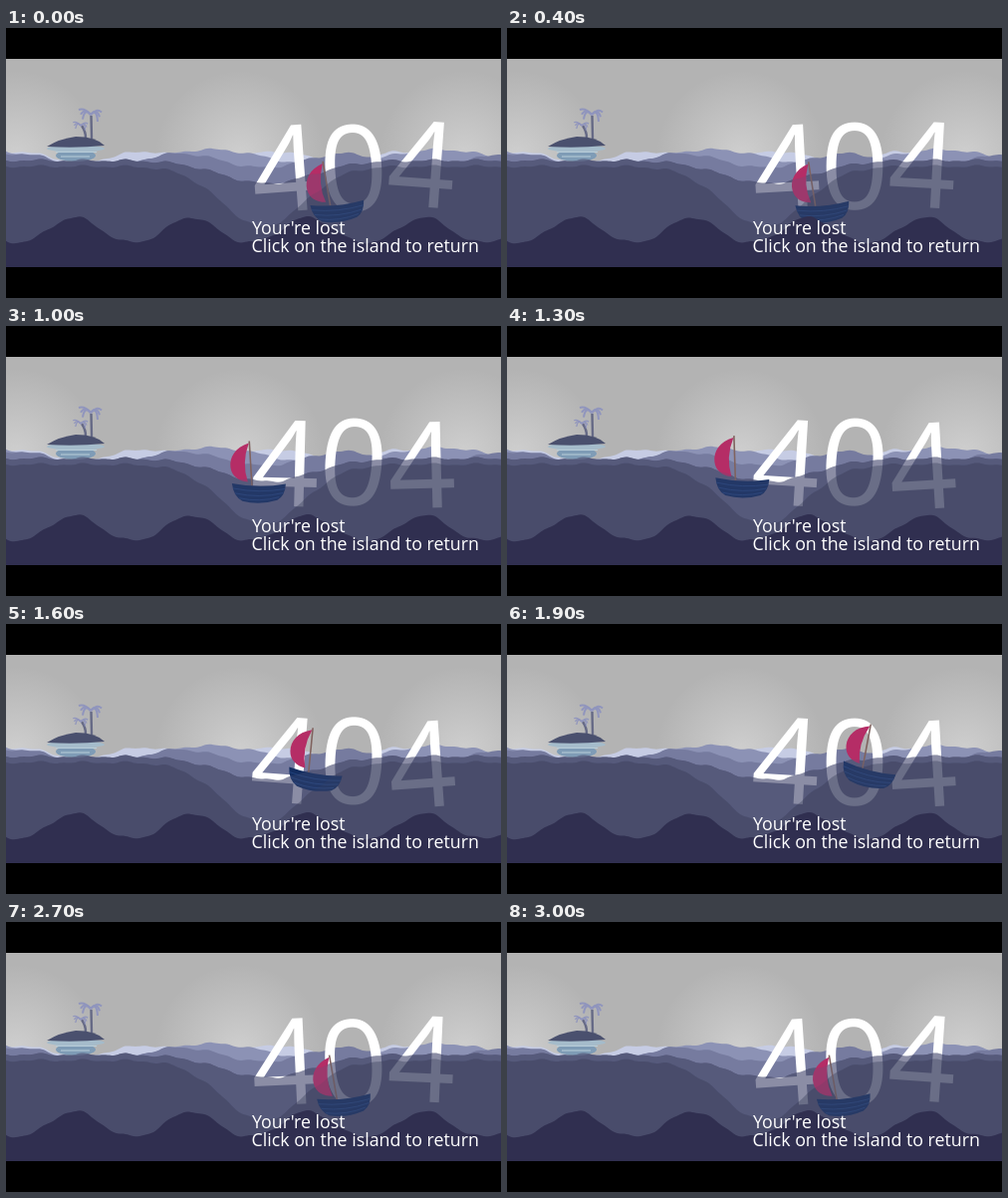
Recreate the animation shown at these times as an HTML page with a canvas. Size 497 px wide and 271 px high, loop 3.1 s.

```html
<!DOCTYPE html>
<html lang="en">
<head>
<meta charset="utf-8">
<title>404</title>
<style>
  html, body { margin: 0; width: 100%; height: 100%; overflow: hidden; background: #000; }
  canvas { display: block; }
</style>
</head>
<body>
<canvas id="stage" width="497" height="271"></canvas>
<script>
const ctx = document.getElementById('stage').getContext('2d');
const W = 497, H = 271, LOOP = 3100, STEP = 100;
const FONT = '"Open Sans", "Noto Sans", sans-serif';

const wave = (x, peak, period) => Math.cos(2 * Math.PI * (x - peak) / period);
const bump = (x, center, width) => Math.exp(-(((x - center) / width) ** 2));
const rough = x => Math.sin(x / 7) + 0.6 * Math.sin(x / 3.3);

// Area below a ridge line, slightly roughened.
function ridge(height) {
  const path = new Path2D();
  path.moveTo(0, H);
  for (let x = 0; x <= W + 2; x += 2) path.lineTo(x, height(x) + rough(x));
  path.lineTo(W, H);
  return path;
}

const clouds = ridge(x => 129 - 5 * wave(x, 140, 130));
const far = ridge(x => 130 - 8 * wave(x, 205, 230));
const mid = ridge(x => 133 - 7 * wave(x, 10, 165));
const hills = ridge(x => 133 + 23 * bump(x, 262, 65));
const slopes = ridge(x => 139 + 60 * bump(x, 258, 58));
const front = ridge(x => 215 - 25 * (0.5 + 0.5 * wave(x, 69, 117)) ** 1.2);
const HILL = '#565a7b', SLOPE = '#3f445d';

function fill(path, color, alpha = 1) {
  ctx.globalAlpha = alpha;
  ctx.fillStyle = color;
  ctx.fill(path);
  ctx.globalAlpha = 1;
}

function stroke(d, color, width) {
  ctx.strokeStyle = color;
  ctx.lineWidth = width;
  ctx.stroke(new Path2D(d));
}

function ellipse(x, y, rx, ry, color) {
  ctx.fillStyle = color;
  ctx.beginPath();
  ctx.ellipse(x, y, rx, ry, 0, 0, 2 * Math.PI);
  ctx.fill();
}

// Things standing in the hills show through this haze.
function haze(hillAlpha, slopeAlpha) {
  fill(hills, HILL, hillAlpha);
  fill(slopes, SLOPE, slopeAlpha);
}

function glow(x, y, r) {
  const g = ctx.createRadialGradient(x, y, 0, x, y, r);
  g.addColorStop(0, 'rgba(225,225,225,.6)');
  g.addColorStop(1, 'rgba(225,225,225,0)');
  ctx.fillStyle = g;
  ctx.fillRect(0, 0, W, H);
}

function palm(x, y, size) {
  for (let i = 0; i < 6; i++) {
    const side = i % 2 ? 1 : -1;
    const tipX = x + side * size * (12 - i), tipY = y + size * (i * 2.4 - 5);
    stroke(`M${x} ${y}Q${x + side * size * 6} ${y - size * 7} ${tipX} ${tipY}`, '#9095bd', 2 * size);
  }
}

function island() {
  ellipse(70, 128, 20, 6, '#7f9cb6');
  ellipse(70, 121, 29, 3.5, '#a5bccb');
  stroke('M50 124.5H91M55 129H84', '#b9ced9', 1);
  stroke('M86 111L85.5 88M80 110Q80 104 76 98', '#666a86', 2.4);
  palm(85, 87, 1);
  palm(75, 98, 0.65);
  fill(new Path2D('M41 119Q54 111 70 109Q90 109 99 118Q70 121 41 119Z'), '#4a506e');
}

// Digits rise and lean together; `peak` is the moment of the highest pose.
function digit(char, x, peak, t) {
  const swing = wave(t, peak, LOOP);
  ctx.save();
  ctx.translate(x + 34.3, 138.8 - 2.4 * swing);
  ctx.rotate(4.2 * swing * Math.PI / 180);
  ctx.fillText(char, -34.3, 43);
  ctx.restore();
}

// time, x, y, tilt in degrees
const voyage = [
  [1350, 236, 162, 0],
  [2000, 366, 153, 13],
  [2500, 342, 184, -8],
  [3000, 339, 184, -8],
  [3650, 316, 185, -7],
  [4450, 236, 162, 0]
];

function boatPose(t) {
  if (t < voyage[0][0]) t += LOOP;
  const i = voyage.findIndex(key => key[0] > t);
  const from = voyage[i - 1], to = voyage[i];
  const p = Math.sin((t - from[0]) / (to[0] - from[0]) * Math.PI / 2);
  return from.slice(1).map((v, k) => v + (to[k + 1] - v) * p);
}

function boat(t) {
  const [x, y, tilt] = boatPose(t);
  ctx.save();
  ctx.translate(x, y);
  ctx.rotate(tilt * Math.PI / 180);
  stroke('M-8.5-52L-7-7', '#80635f', 1.6);
  fill(new Path2D('M-9-50C-23-46-29-36-28-26C-27-17-20-12-11-11Q-17-30-9-50Z'), '#b52d66');
  fill(new Path2D('M-27-10Q0-4 27-8Q26 4 18 8Q0 13-17 8Q-26 3-27-10Z'), '#132d60');
  stroke('M-26-5Q0 1 26-3M-24 0Q0 6 24 1M-20 5Q0 10 20 5', '#234580', 0.8);
  ctx.restore();
}

function draw(t) {
  ctx.fillStyle = '#b3b3b3';
  ctx.fillRect(0, 0, W, H);
  for (let x = 10; x < W; x += 225) glow(x, 128, 85);
  fill(clouds, '#c6cce4');
  fill(far, '#8c92b5');
  fill(mid, '#767b9f');
  haze(1, 1);
  island();

  ctx.fillStyle = '#fff';
  ctx.font = `120px ${FONT}`;
  digit('4', 246, 1600, t);
  digit('0', 314.6, 1150, t);
  digit('4', 383.2, 50, t);
  haze(0.58, 0.35);

  boat(t);
  haze(0.25, 0.15);
  fill(front, '#302f50');

  ctx.fillStyle = '#fff';
  ctx.font = `17.8px ${FONT}`;
  ctx.fillText("Your're lost", 247, 207);
  ctx.fillText('Click on the island to return', 246.5, 225);

  ctx.fillStyle = '#000';
  ctx.fillRect(0, 0, W, 31);
  ctx.fillRect(0, 240, W, 31);
}

const start = performance.now();
function frame() {
  const t = (performance.now() - start) % LOOP;
  draw(Math.floor(t / STEP) * STEP);
  requestAnimationFrame(frame);
}
frame();
</script>
</body>
</html>
```
